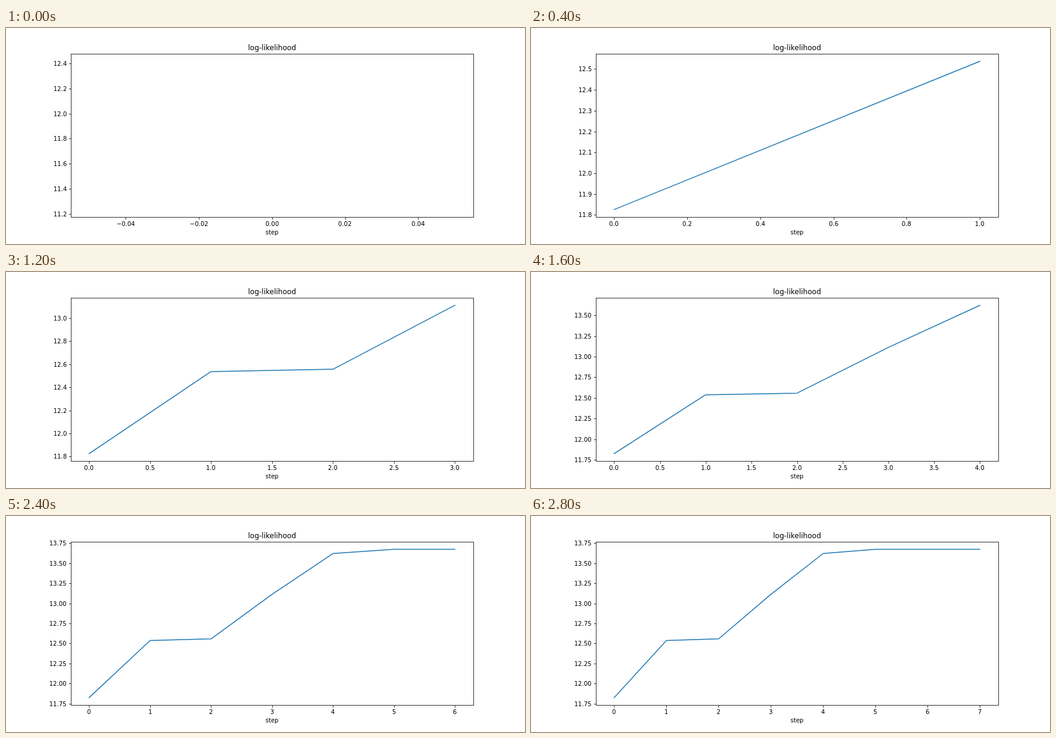
These frames come from a looping animation (864x360 px, 3200 ms). An HTML page with a canvas:

```html
<!DOCTYPE html>
<html lang="en">
<head>
<meta charset="utf-8">
<title>log-likelihood</title>
<style>
  html, body { margin: 0; width: 100%; height: 100%; overflow: hidden; background: #fff; }
  canvas { display: block; }
</style>
</head>
<body>
<canvas id="chart" width="864" height="360"></canvas>
<script>
const STEP_MS = 400;
const values = [11.825, 12.537, 12.557, 13.112, 13.621, 13.673, 13.673, 13.673];
const plot = { left: 108, right: 777.6, top: 43.2, bottom: 315 };
const ctx = document.getElementById('chart').getContext('2d');

// Data range with a 5% margin; a single value is first widened.
function limits(min, max) {
  if (min === max) {
    const pad = 0.05 * (Math.abs(min) || 1);
    min -= pad;
    max += pad;
  }
  const margin = 0.05 * (max - min);
  return [min - margin, max + margin];
}

// Round tick values, at most nine intervals.
function ticks([lo, hi]) {
  const raw = (hi - lo) / 9;
  const power = 10 ** Math.floor(Math.log10(raw));
  const step = [1, 2, 2.5, 5, 10].find(s => s * power >= raw) * power;
  let digits = 0;
  while (Math.abs(step * 10 ** digits - Math.round(step * 10 ** digits)) > 1e-6) digits++;
  const result = [];
  for (let k = Math.ceil(lo / step); k * step <= hi; k++) {
    result.push({ value: k * step, label: (k * step).toFixed(digits).replace('-', '\u2212') });
  }
  return result;
}

function scale([lo, hi], from, to) {
  return v => from + (v - lo) / (hi - lo) * (to - from);
}

// align: 0.5 centres the text on x, 1 ends it there.
function text(str, x, baseline, align = 0.5, size = 10) {
  ctx.font = `${size}px "DejaVu Sans", sans-serif`;
  ctx.fillText(str, Math.round(x - ctx.measureText(str).width * align), baseline);
}

function segment(x1, y1, x2, y2) {
  ctx.beginPath();
  ctx.moveTo(x1, y1);
  ctx.lineTo(x2, y2);
  ctx.stroke();
}

function draw(count) {
  const shown = values.slice(0, count);
  const xRange = limits(0, count - 1);
  const yRange = limits(Math.min(...shown), Math.max(...shown));
  const toX = scale(xRange, plot.left, plot.right);
  const toY = scale(yRange, plot.bottom, plot.top);

  ctx.fillStyle = '#fff';
  ctx.fillRect(0, 0, 864, 360);
  ctx.fillStyle = ctx.strokeStyle = '#000';
  ctx.lineWidth = 0.8;
  ctx.lineCap = 'butt';

  for (const { value, label } of ticks(xRange)) {
    const x = toX(value), px = Math.round(x) + 0.5;
    segment(px, 315.5, px, 319.5);
    text(label, x, 330);
  }
  for (const { value, label } of ticks(yRange)) {
    const y = Math.round(toY(value));
    segment(105, y + 0.5, 108.5, y + 0.5);
    text(label, 101, y + 4, 1);
  }

  ctx.strokeStyle = '#1f77b4';
  ctx.lineWidth = 1.5;
  ctx.lineCap = 'square';
  ctx.lineJoin = 'round';
  ctx.beginPath();
  shown.forEach((v, i) => ctx.lineTo(toX(i), toY(v)));
  if (count > 1) ctx.stroke();

  ctx.strokeStyle = '#000';
  ctx.lineWidth = 0.8;
  ctx.lineJoin = 'miter';
  ctx.strokeRect(108.5, 43.5, 670, 272);

  text('step', 442.8, 344);
  text('log-likelihood', 442.8, 37, 0.5, 12);
}

function frame() {
  draw(Math.floor(performance.now() / STEP_MS) % values.length + 1);
  requestAnimationFrame(frame);
}
frame();
</script>
</body>
</html>
```
